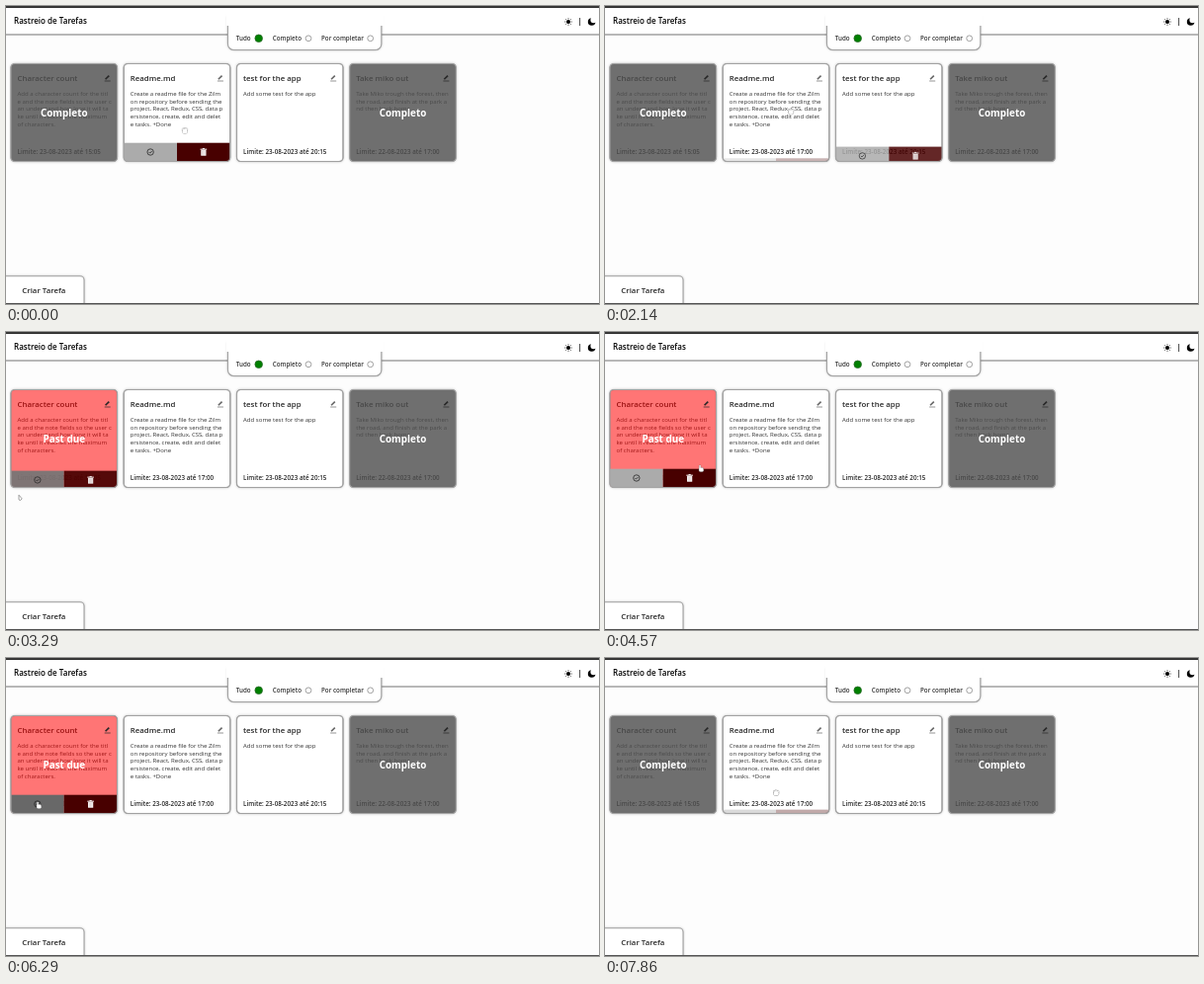
An HTML page with a canvas for the animation above (8000 ms loop, 600 by 302 pixels).

```html
<!DOCTYPE html>
<html lang="pt">
<head>
<meta charset="utf-8">
<title>Rastreio de Tarefas</title>
<style>
html, body { margin: 0; width: 100%; height: 100%; overflow: hidden; background: #fdfdfd; }
canvas { display: block; width: 600px; height: 302px; }
</style>
</head>
<body>
<canvas id="stage" width="600" height="302"></canvas>
<script>
const ctx = document.getElementById('stage').getContext('2d');
const LOOP = 8000, STEP = 1000 / 7;
const CARD = { x: 5, gap: 114.25, y: 58.5, w: 107.5, h: 99, r: 4 };
const BAR = { y: 138.7, h: 19.5 };
const INK = '#262626', EDGE = '#a2a2a2';

const cards = [
  { title: 'Character count', due: '23-08-2023 até 15:05',
    body: ['Add a character count for the titl', 'e and the note fields so the user c',
      'an understand how long it will ta', 'ke until it reaches the maximum', 'of characters.'],
    state: t => t >= 3140 && t < 6420 ? 'late' : 'done' },
  { title: 'Readme.md', due: '23-08-2023 até 17:00',
    body: ['Create a readme file for the Zilm', 'on repository before sending the',
      'project, React, Redux, CSS, data p', 'ersistence, create, edit and delet', 'e tasks. +Done'],
    state: () => 'open' },
  { title: 'test for the app', due: '23-08-2023 até 20:15',
    body: ['Add some test for the app'], state: () => 'open' },
  { title: 'Take miko out', due: '22-08-2023 até 17:00',
    body: ['Take Miko trough the forest, then', 'the road, and finish at the park a', 'nd then back home.'],
    state: () => 'done' }
];
cards.forEach((c, i) => c.x = CARD.x + i * CARD.gap);

// Places where the pointer rests
const stops = [
  { from: 0, to: 430, x: 181, y: 126 },
  { from: 1290, to: 1290, x: 331, y: 85 },
  { from: 1430, to: 1860, x: 333, y: 79 },
  { from: 2430, to: 2600, x: 40, y: 135 },
  { from: 2860, to: 3230, x: 33, y: 148 },
  { from: 3286, to: 3430, x: 14, y: 168 },
  { from: 4000, to: 4290, x: 100, y: 90 },
  { from: 4571, to: 4600, x: 97, y: 138 },
  { from: 5140, to: 5430, x: 60, y: 214 },
  { from: 6150, to: 6430, x: 33, y: 149 },
  { from: 7290, to: 7520, x: 50, y: 283 },
  { from: 7890, to: LOOP, x: 176, y: 133 }
];

function pointerAt(t) {
  t = Math.max(0, t);
  const i = stops.findLastIndex(s => s.from <= t), a = stops[i], b = stops[i + 1] || a;
  const k = t <= a.to ? 0 : (t - a.to) / (b.from - a.to), e = k * k * (3 - 2 * k);
  return { x: a.x + (b.x - a.x) * e, y: a.y + (b.y - a.y) * e };
}

const inside = (p, x, y, w, h) => p.x >= x && p.x <= x + w && p.y >= y && p.y <= y + h;

// Linear transition: the share of the last d ms spent inside the box
function dwell(t, d, ...box) {
  const n = 30;
  let hits = 0;
  for (let i = 0; i < n; i++) hits += inside(pointerAt(t - d * i / n), ...box);
  return hits / n;
}

// Shaped at ten times the size so that advances stay fractional
function text(s, x, y, size, weight = 400, color = INK, align = 'left') {
  ctx.save();
  ctx.translate(x, y);
  ctx.scale(0.1, 0.1);
  ctx.font = `${weight} ${size * 10}px "Open Sans", "Noto Sans", sans-serif`;
  ctx.textAlign = align;
  ctx.fillStyle = color;
  ctx.fillText(s, 0, 0);
  ctx.restore();
}

function rect(x, y, w, h, color) {
  ctx.fillStyle = color;
  ctx.fillRect(x, y, w, h);
}

function line(color, width, ...pts) {
  ctx.beginPath();
  pts.forEach(p => ctx.lineTo(...p));
  ctx.strokeStyle = color;
  ctx.lineWidth = width;
  ctx.stroke();
}

function disc(x, y, r, fill, stroke) {
  ctx.beginPath();
  ctx.arc(x, y, r, 0, 7);
  if (fill) { ctx.fillStyle = fill; ctx.fill(); }
  if (stroke) { ctx.strokeStyle = stroke; ctx.lineWidth = 0.8; ctx.stroke(); }
}

function edge(x, y, w, h, radii) {
  ctx.beginPath();
  ctx.roundRect(x, y, w, h, radii);
  ctx.strokeStyle = EDGE;
  ctx.lineWidth = 1.1;
  ctx.stroke();
}

function panel(x, y, w, h, radii) {
  ctx.save();
  ctx.beginPath();
  ctx.roundRect(x, y, w, h, radii);
  ctx.shadowColor = 'rgba(0,0,0,.45)';
  ctx.shadowBlur = 2.5;
  ctx.fillStyle = '#fff';
  ctx.fill();
  ctx.restore();
  edge(x, y, w, h, radii);
}

function pencil(x, y, color) {
  ctx.save();
  ctx.translate(x, y);
  line(color, 1.6, [-1.9, 1.3], [1.8, -2.4]);
  line(color, 0.7, [-2.8, 3], [3.2, 3]);
  ctx.restore();
}

function trash(x, y) {
  rect(x - 2.6, y - 1.9, 5.2, 5.6, '#fff');
  rect(x - 3.3, y - 3.3, 6.6, 1, '#fff');
  rect(x - 1.1, y - 4, 2.2, 0.9, '#fff');
  for (const d of [-1.3, 0, 1.3]) line('#a88', 0.35, [x + d, y - 1], [x + d, y + 2.8]);
}

function mark(x, y, done) {
  disc(x, y, 3.2, null, INK);
  if (done) {
    for (const s of [-1, 1]) line(INK, 0.8, [x - 1.2, y - 1.2 * s], [x + 1.2, y + 1.2 * s]);
  } else line(INK, 0.8, [x - 1.5, y], [x - 0.4, y + 1.1], [x + 1.6, y - 1]);
}

function buttons(x, t, done) {
  const { y, w, h } = CARD, v = dwell(t, 300, x, y, w, h);
  if (!v) return;
  const top = BAR.y + (1 - v) * BAR.h, mid = top + 9.3;
  const g = Math.round(171 - 67 * dwell(t, 140, x, BAR.y, w / 2, BAR.h));
  ctx.globalAlpha = Math.pow(v, 0.75);
  rect(x, top, w / 2, BAR.h, `rgb(${g},${g},${g})`);
  rect(x + w / 2, top, w / 2, BAR.h, '#480000');
  mark(x + w / 4, mid, done);
  trash(x + w * 0.75, mid);
}

function drawCard(c, t) {
  const { x } = c, { y, w, h, r } = CARD, state = c.state(t), open = state === 'open', late = state === 'late';
  panel(x, y, w, h, r);
  text(c.title, x + 6.5, 75.7, 7.85, 600);
  c.body.forEach((s, i) => text(s, x + 6.5, 90.7 + i * 7.85, 6.06, 400, '#333'));
  text('Limite: ' + c.due, x + 6.5, 150.2, 6.3, 600);

  ctx.save();
  ctx.beginPath();
  ctx.roundRect(x, y, w, h, r);
  ctx.clip();
  if (!open) {
    rect(x, y, w, h, late ? 'rgba(255,0,0,.54)' : 'rgba(80,80,80,.82)');
    text(late ? 'Past due' : 'Completo', x + w / 2, 111.8, 9.9, 700, '#fff', 'center');
  }
  buttons(x, t, state === 'done');
  ctx.restore();
  edge(x, y, w, h, r);
  pencil(x + 97.5, 73, open ? '#666' : INK);
}

function option(label, x, dotX, on) {
  text(label, x, 35.2, 6.25, 600, '#333');
  disc(dotX, 32.8, on ? 3.8 : 2.9, on ? '#008000' : '#fff', on ? '#2a6a2a' : '#8c8c8c');
}

function sun(x, y) {
  disc(x, y, 2, '#000');
  for (let a = 0; a < 6; a += Math.PI / 4) {
    const c = Math.cos(a), s = Math.sin(a);
    line('#222', 0.8, [x + c * 2.6, y + s * 2.6], [x + c * 3.8, y + s * 3.8]);
  }
}

function moon(x, y) {
  disc(x, y, 3.8, '#000');
  disc(x + 2, y - 1.9, 3.2, '#fff');
}

function drawChrome() {
  rect(0, 0, 600, 302, '#fdfdfd');
  rect(0, 0, 600, 28, '#fff');
  rect(0, 28, 600, 2, '#b8b8b8');
  panel(224.5, 10, 155.3, 34.5, [0, 0, 6, 6]);
  rect(223, 0, 159, 20, '#fff');
  rect(0, 0, 600, 2, '#363636');
  text('Rastreio de Tarefas', 8, 18.4, 8.05, 600, '#000');

  option('Tudo', 232.7, 255.7, true);
  option('Completo', 269.7, 306, false);
  option('Por completar', 319, 368.7, false);
  sun(569, 16);
  rect(580.2, 12, 0.9, 8, '#333');
  moon(592.6, 16);

  panel(-4, 273.7, 83, 34, [0, 4, 0, 0]);
  text('Criar Tarefa', 16.3, 291, 7.85, 600);
  rect(0, 301, 600, 1, '#555');
}

function blob(...box) {
  ctx.beginPath();
  ctx.roundRect(...box);
  ctx.stroke();
  ctx.fill();
}

function drawPointer(t) {
  const p = pointerAt(t);
  const over = cards.find(c => inside(p, c.x, CARD.y, CARD.w, CARD.h));
  const onCreate = inside(p, 0, 273, 79, 28);
  ctx.save();
  ctx.translate(p.x, p.y);
  ctx.fillStyle = '#fff';
  ctx.strokeStyle = '#888';
  ctx.lineWidth = 0.8;
  if (over && over.state(t) === 'open') {
    for (let i = 0; i < 4; i++) blob(-2.6 + i * 1.3, -2.6 + Math.abs(i - 1.5) * 0.4, 1.3, 3, 0.6);
    blob(-2.5, -0.6, 5, 3.6, 1.6);
    rect(-2, -1.2, 4, 1.6, '#fff');
  } else if (over || onCreate) {
    ctx.strokeStyle = '#555';
    blob(-1.6, -3, 1.3, 5, 0.6);
    blob(-1.8, -0.4, 4.4, 4, 1.3);
    rect(-1.4, -1, 0.9, 2, '#fff');
  } else {
    ctx.beginPath();
    [[-1, -2.8], [-1, 2], [0.6, 2.6], [2.1, 0.8]].forEach(q => ctx.lineTo(...q));
    ctx.closePath();
    ctx.fill();
    ctx.stroke();
  }
  ctx.restore();
}

function frame(now) {
  const t = Math.floor((now % LOOP + 5) / STEP) * STEP % LOOP;
  drawChrome();
  cards.forEach(c => drawCard(c, t));
  drawPointer(t);
  requestAnimationFrame(frame);
}
requestAnimationFrame(frame);
</script>
</body>
</html>
```
